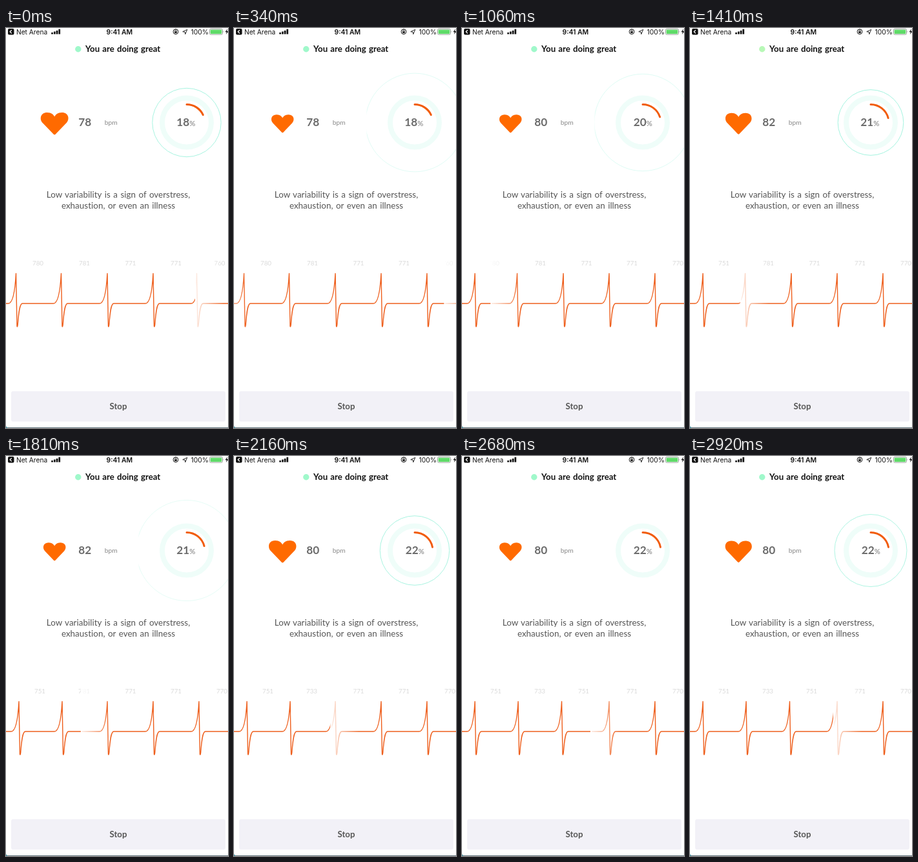
An HTML page that plays this animation: 344x620 px, repeating every 3.02 s.

```html
<!DOCTYPE html>
<html lang="en">
<head>
<meta charset="utf-8">
<title>Heart rate</title>
<style>
  html, body { margin: 0; width: 100%; height: 100%; overflow: hidden; background: #fff; }
  svg { display: block; width: 344px; height: 620px; }
  text { font-family: Lato, "Open Sans", sans-serif; }
  .status { font: 400 10.2px Inter, Roboto, sans-serif; fill: #111; }
  .strong { font-weight: 700; }
  .title { font-size: 13.2px; word-spacing: 1px; fill: #111; }
  .advice { font-size: 13.4px; word-spacing: 1px; letter-spacing: .04px; fill: #555; }
  .value { font-size: 17.2px; fill: #6b6b6b; }
  .unit { font-size: 10.3px; fill: #888; }
  .trace path { fill: none; stroke: #ee5f1d; stroke-width: 1.4; stroke-linejoin: round; }
  .trace text { font-size: 9.8px; fill: #dadada; text-anchor: middle; }
</style>
</head>
<body>
<svg viewBox="0 0 344 620">
  <defs>
    <linearGradient id="oldFade" gradientUnits="userSpaceOnUse" y1="0" y2="0">
      <stop offset="0" stop-color="#fff" stop-opacity=".1"/><stop offset="1" stop-color="#fff"/>
    </linearGradient>
    <linearGradient id="newFade" gradientUnits="userSpaceOnUse" y1="0" y2="0">
      <stop offset="0" stop-color="#fff" stop-opacity=".1"/><stop offset="1" stop-color="#fff"/>
    </linearGradient>
    <mask id="oldMask" maskUnits="userSpaceOnUse" x="-5" y="340" width="360" height="140">
      <rect id="oldArea" y="340" width="360" height="140" fill="url(#oldFade)"/>
    </mask>
    <mask id="newMask" maskUnits="userSpaceOnUse" x="-5" y="340" width="360" height="140">
      <rect id="newArea" x="-5" y="340" height="140" fill="url(#newFade)"/>
    </mask>
    <clipPath id="rippleClip"><rect x="205.5" width="139" height="300"/></clipPath>
  </defs>
  <rect width="344" height="620" fill="#fff"/>

  <!-- status bar -->
  <rect x="3" y="1" width="9.5" height="9.5" rx="2" fill="#111"/>
  <path d="M8.7 3.2L6.2 5.8L8.7 8.4" fill="none" stroke="#fff" stroke-width="1.3"/>
  <text class="status" x="16" y="9.6">Net Arena</text>
  <path d="M70.2 7h2.7v2.6h-2.7zM74 5.6h2.7v4H74zM77.7 3.9h2.7v5.7h-2.7zM81.4 1.8h2.7v7.8h-2.7z" fill="#111"/>
  <text class="status" x="155.5" y="9.6" style="font-weight:600;font-size:10.4px">9:41 AM</text>
  <g fill="none" stroke="#111">
    <circle cx="263" cy="5.7" r="3.9"/>
    <path d="M261.7 5.4v-1a1.3 1.3 0 0 1 2.6 0v1" stroke-width=".8"/>
    <path d="M273.8 5.7L280.8 2.4L277.8 9.6L277.2 6.2Z" stroke-width=".9" stroke-linejoin="round"/>
  </g>
  <rect x="261.2" y="5.2" width="3.6" height="2.7" fill="#111"/>
  <text class="status" x="286.5" y="9.6" style="font-size:10.4px">100%</text>
  <rect x="315.5" y="1.5" width="20" height="8.6" rx="1.8" fill="#fff" stroke="#8b968d" stroke-width=".9"/>
  <rect x="316.7" y="2.7" width="17.6" height="6.2" rx=".8" fill="#5fdb68"/>
  <path d="M336.6 4.2q1.4 1.5 0 3z" fill="#8b968d"/>
  <path d="M343 1.6L339.6 6.2H341.9L340.9 10L344.6 5H342.3Z" fill="#111"/>

  <circle id="dot" cx="111.8" cy="32.8" r="4.7"/>
  <text class="title strong" x="123" y="37">You are doing great</text>

  <path id="heart" fill="#ff6a00" d="M1.2 17Q0 18 -1.2 17L-18.5 -1C-24 -6.5 -22.6 -17.5 -11.5 -17.5C-5 -17.5 -1.5 -14 0 -11C1.5 -14 5 -17.5 11.5 -17.5C22.6 -17.5 24 -6.5 18.5 -1Z"/>
  <text id="bpm" class="value strong" x="112.2" y="152"></text>
  <text class="unit" x="152.8" y="149.5">bpm</text>

  <circle cx="280" cy="146.5" r="38" fill="none" stroke="#effdf9" stroke-width="8"/>
  <g clip-path="url(#rippleClip)">
    <circle id="ripple" cx="280" cy="146.5" fill="none" stroke="#a4f3df" stroke-width="1"/>
  </g>
  <path id="arc" fill="none" stroke="#f15c0c" stroke-width="3" stroke-linecap="round"/>
  <text id="percent" class="value strong" y="152" text-anchor="end"></text>
  <text id="sign" class="unit" y="152" style="font-size:11.3px;fill:#777">%</text>

  <text class="advice" x="174" y="263" text-anchor="middle">Low variability is a sign of overstress,</text>
  <text class="advice" x="174" y="279.5" text-anchor="middle">exhaustion, or even an illness</text>

  <g class="trace" mask="url(#oldMask)"><g id="oldTrace"></g></g>
  <g class="trace" mask="url(#newMask)"><g id="newTrace"></g></g>

  <rect x="8" y="563" width="332" height="47" rx="3" fill="#f2f1f7"/>
  <text class="strong" x="174" y="591.3" text-anchor="middle" font-size="13.2" fill="#555">Stop</text>
  <rect y="619" width="344" height="1" fill="#64777f"/>
  <path d="M0 616.5Q.3 619 3 620H0Z" fill="#2b8596"/>
</svg>
<script>
const LOOP = 3020, SPEED = 0.0955, START = 293, SWEEP = 350, LEFT = -3, FADE = 44;
const $ = id => document.getElementById(id);
const set = (id, attrs) => {
  for (const name in attrs) $(id).setAttribute(name, attrs[name]);
};
const clamp = v => Math.max(0, Math.min(1, v));

// Each sweep of the trace: spike positions and [x, interval] labels.
const sweeps = [
  { spikes: [295.5], labels: [[331, 760]] },
  { spikes: [15.5, 85.5, 157, 228, 299],
    labels: [[49.5, 780], [121.5, 781], [193, 771], [263.5, 771], [334.5, 770]] },
  { spikes: [20, 87, 154.5, 224], labels: [[52.5, 751], [120.5, 733], [188.5, 751]] }
];
const beats = [63, 800, 1508, 2215, 2942];
const readings = [[78, 18], [80, 20], [82, 21], [80, 22], [80, 22]];

const spikePath = x =>
  `H${x - 12}C${x - 5} 427 ${x - 1.5} 408 ${x} 380.5L${x + 1.5} 462` +
  `Q${x + 2} 465 ${x + 2.7} 460C${x + 4.2} 440 ${x + 5.8} 427 ${x + 10} 427`;

const traceMarkup = ({ spikes, labels }) =>
  `<path d="M-5 427${spikes.map(spikePath).join('')}H350"/>` +
  labels.map(([x, n]) => `<text x="${x}" y="367.7">${n}</text>`).join('');

let shownLap = 0;

function drawTrace(t) {
  const travel = START + SPEED * t - LEFT;
  const lap = 1 + Math.floor(travel / SWEEP);
  const front = travel % SWEEP + LEFT;
  if (lap !== shownLap) {
    $('oldTrace').innerHTML = traceMarkup(sweeps[lap - 1]);
    $('newTrace').innerHTML = traceMarkup(sweeps[lap]);
    shownLap = lap;
  }
  set('oldArea', { x: front + 1.5 });
  set('newArea', { width: front + 5 });
  set('oldFade', { x1: front, x2: front + FADE });
  set('newFade', { x1: front - SWEEP, x2: front - SWEEP + FADE });
}

function drawPulse(t) {
  const since = t - beats.find(b => t < b + 400 || b === beats.at(-1));
  const swell = Math.min(clamp((since + 150) / 75), clamp((150 - since) / 225));
  set('heart', { transform: `translate(75.2 148.3) scale(${0.8 + 0.2 * swell})` });
  const radius = 57.5 + 0.068 * since;
  const visible = since > -160 && radius < 85;
  set('ripple', { r: Math.max(radius, 0), opacity: visible ? clamp((88 - radius) / 36) : 0 });
}

function drawReadings(t) {
  const index = Math.max(0, beats.findLastIndex(b => t >= b - 130));
  const [bpm, percent] = readings[index];
  const angle = percent / 100 * 2 * Math.PI;
  const signX = percent % 10 === 0 || percent === 22 ? 285.8 : 284.2;
  $('bpm').textContent = bpm;
  $('percent').textContent = percent;
  set('percent', { x: signX });
  set('sign', { x: signX });
  set('arc', { d: `M280 118.5A28 28 0 0 1 ${280 + 28 * Math.sin(angle)} ${146.5 - 28 * Math.cos(angle)}` });
}

function drawDot(t) {
  const tint = Math.sin(Math.PI * clamp((t - 1180) / 510));
  set('dot', { fill: `rgb(${160 + 24 * tint},248,${203 - 20 * tint})` });
}

function render(t) {
  drawTrace(t);
  drawPulse(t);
  drawReadings(t);
  drawDot(t);
}

let origin;
function tick(now) {
  origin ??= now;
  render((now - origin) % LOOP);
  requestAnimationFrame(tick);
}
render(0);
requestAnimationFrame(tick);
</script>
</body>
</html>
```
